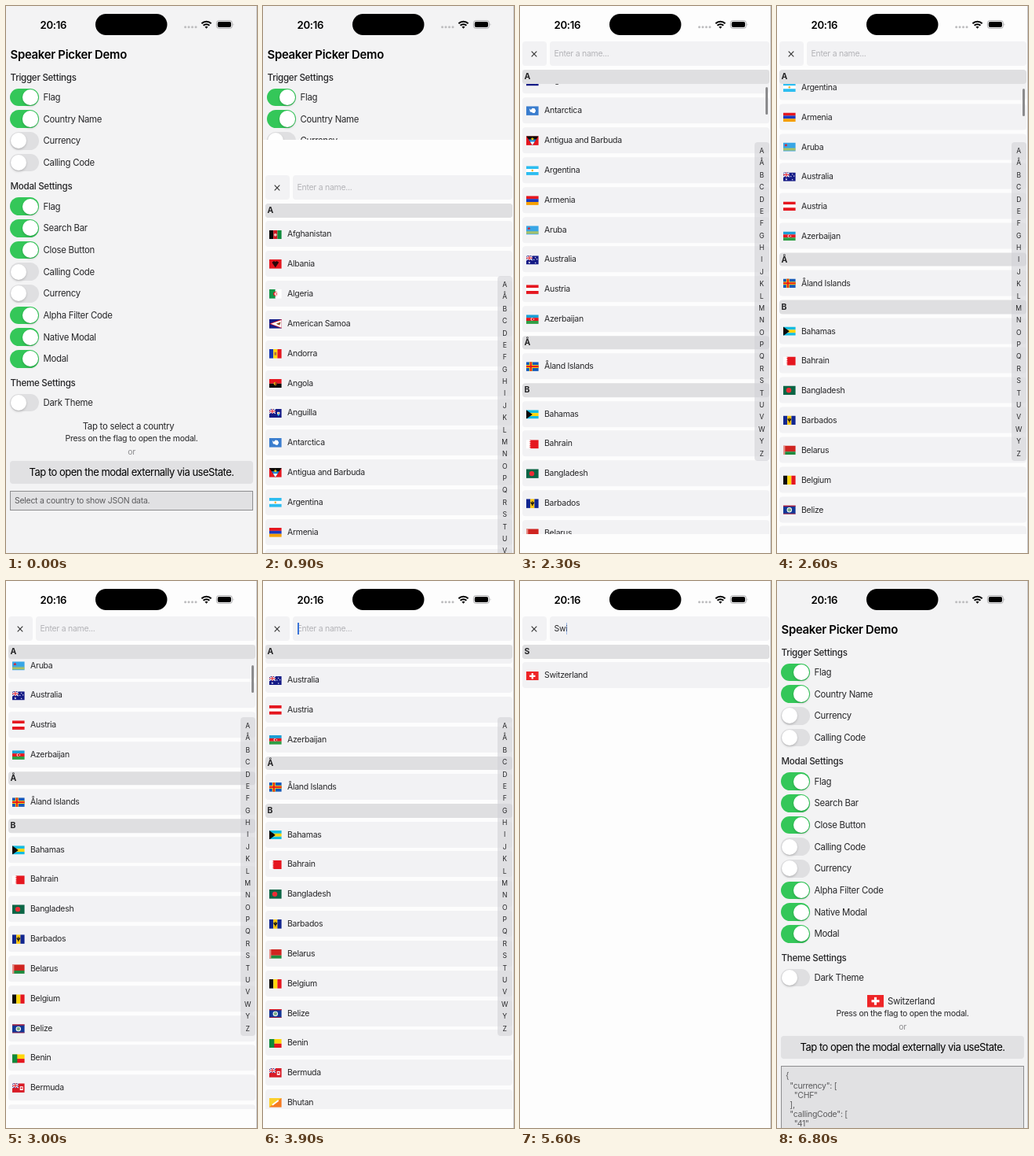
Recreate the animation shown at these times as an HTML page. Size 320 by 695 pixels, loop 8000 ms.

```html
<!DOCTYPE html>
<html lang="en">
<head>
<meta charset="utf-8">
<title>Country picker</title>
<style>
  html, body { margin: 0; width: 100%; height: 100%; overflow: hidden; background: #f3f3f4; }
  #stage { position: absolute; left: 0; top: 0; width: 320px; height: 695px; overflow: hidden;
    font: 10.5px Inter, sans-serif; letter-spacing: -.027em; color: #262628; }
  #stage div, #stage svg { position: absolute; box-sizing: border-box; }
  .t { white-space: pre; height: 20px; line-height: 20px; }
  .mid { left: 0; width: 320px; text-align: center; }
  .head { font-size: 11.6px; font-weight: 500; left: 5.5px; }
  .opt { font-size: 11.4px; left: 47.5px; }
  .switch { left: 5px; width: 37.2px; height: 22.6px; border-radius: 12px; background: #dfdfe1; }
  .switch::after { content: ""; position: absolute; left: 1.2px; top: 1.2px; width: 20.2px; height: 20.2px;
    border-radius: 50%; background: #fff; box-shadow: 0 1.5px 3px rgba(0,0,0,.18); }
  .switch.on { background: #34c759; }
  .switch.on::after { left: 15.8px; }
  .screen { left: 0; top: 0; width: 320px; height: 695px; }
  #home { background: #f3f3f4; }
  #picked { left: -4px; top: 524.3px; font-size: 11.4px; }
  #button { left: 5px; top: 578px; width: 310px; height: 28.5px; line-height: 28.5px; border-radius: 4px;
    background: #e1e1e3; color: #000; font-size: 13px; letter-spacing: -.038em; text-align: center; }
  #json { left: 5px; top: 616px; width: 310px; padding: 6.3px 5px 4.3px; border: 1px solid #8d8d8f;
    background: #e1e1e3; color: #5c5c5e; font-size: 10.5px; line-height: 12.2px; white-space: pre; }
  #modal { background: #fdfdfd; }
  .box, .row { background: #f2f2f4; border-radius: 4px; }
  #list { left: 0; top: 81px; width: 320px; height: 590px; overflow: hidden; }
  .page { left: 0; top: 0; width: 320px; }
  .row { left: 3px; width: 315px; height: 33px; line-height: 33px; padding-left: 28px; white-space: pre; }
  .row svg { left: 5px; top: 11.2px; width: 15.6px; height: 11.6px; }
  .letter { left: 3px; width: 315px; height: 17.6px; line-height: 17.6px; padding-left: 2.5px;
    border-radius: 4px; background: #dfdfe1; font-weight: 700; }
  #index { left: 299px; top: 173px; width: 18.5px; height: 405px; border-radius: 4px; background: rgba(212,212,216,.62); }
  #index div { left: 0; width: 18.5px; text-align: center; font-size: 8.6px; letter-spacing: 0; }
  #bar { left: 313.3px; width: 2.4px; border-radius: 2px; background: #8b8b8d; }
  #caret { top: 53px; width: 1.4px; height: 15px; background: #3b74d8; }
  #edge { left: 319px; top: 0; width: 1px; height: 695px; background: #c6c6c8; }
</style>
</head>
<body>
<div id="stage">
  <div id="home" class="screen">
    <div class="t" style="left:5.5px;top:51.5px;font-size:14.9px;font-weight:600;color:#000">Speaker Picker Demo</div>
    <div id="picked" class="t mid"></div>
    <div class="t mid" style="top:539.5px">Press on the flag to open the modal.</div>
    <div class="t mid" style="top:557px;color:#8e8e90">or</div>
    <div id="button">Tap to open the modal externally via useState.</div>
    <div id="json"></div>
  </div>
  <div id="modal" class="screen">
    <div class="box" style="left:3px;top:45px;width:30.5px;height:30.5px"></div>
    <svg style="left:14px;top:56.5px" width="8" height="8" stroke="#333" stroke-width="1.1"><path d="M.7 .7L7.3 7.3M7.3 .7L.7 7.3"/></svg>
    <div class="box" style="left:38px;top:45px;width:280px;height:30.5px"></div>
    <div id="query" class="t" style="left:43.5px;top:50.5px"></div>
    <div id="caret"></div>
    <div id="list"><div id="sticky" class="letter" style="top:0;z-index:1"></div></div>
    <div id="bar"></div>
    <div id="index"></div>
  </div>
  <div class="t" style="left:43.5px;top:13.5px;font-size:13.2px;font-weight:600;color:#000">20:16</div>
  <svg width="320" height="45" style="left:0;top:0">
    <rect x="114" y="10" width="91.5" height="27" rx="13.5"/>
    <g fill="#bdbdbf"><circle cx="228.6" cy="26.7" r="1.5"/><circle cx="233" cy="26.7" r="1.5"/><circle cx="237.5" cy="26.7" r="1.5"/><circle cx="242" cy="26.7" r="1.5"/></g>
    <g fill="none" stroke="#000" stroke-width="2"><path d="M249.4 22.2a8.7 8.7 0 0 1 12.2 0M251.6 24.8a5.6 5.6 0 0 1 7.8 0"/></g>
    <path d="M253.5 26.6a2.9 2.9 0 0 1 4 0l-2 2.1z"/>
    <rect x="268.4" y="18.6" width="20" height="9.8" rx="3" fill="none" stroke="#a3a3a5" stroke-width=".9"/>
    <rect x="269.8" y="20" width="17.2" height="7" rx="1.9"/>
    <path d="M289.6 21.8q1.6 1.7 0 3.4z" fill="#a3a3a5"/>
  </svg>
  <div id="edge"></div>
</div>
<script>
const $ = id => document.getElementById(id);
function add(parent, cls, html, top, style = {}) {
  const el = document.createElement('div');
  el.className = cls;
  el.innerHTML = html;
  el.style.top = top + 'px';
  Object.assign(el.style, style);
  parent.append(el);
  return el;
}

// Flag drawing on a 16 x 12 grid
const RED = '#e5161f', BLUE = '#141a86', SKY = '#2cbdf0', GREEN = '#0f8a3c', GOLD = '#ffd60a', W = '#fff', K = '#0a0a0a';
const rect = (x, y, w, h, c) => `<rect x="${x}" y="${y}" width="${w}" height="${h}" fill="${c}"/>`;
const poly = (pts, c) => `<polygon points="${pts}" fill="${c}"/>`;
const dot = (x, y, r, c) => `<circle cx="${x}" cy="${y}" r="${r}" fill="${c}"/>`;
const fill = c => rect(0, 0, 16, 12, c);
const bars = (...cs) => cs.map((c, i) => rect(0, i * 12 / cs.length, 16, 12 / cs.length, c)).join('');
const cols = (...cs) => cs.map((c, i) => rect(i * 16 / cs.length, 0, 16 / cs.length, 12, c)).join('');
const star = (x, y, r, c) => poly([...Array(10)].map((_, i) => {
  const a = i * Math.PI / 5, q = i % 2 ? r * .4 : r;
  return (x + q * Math.sin(a)).toFixed(2) + ',' + (y - q * Math.cos(a)).toFixed(2);
}).join(' '), c);
const moon = (x, y, r, c, bg) => dot(x, y, r, c) + dot(x + r * .35, y, r * .8, bg);
const cross = (bg, a, b) => fill(bg) + rect(4, 0, 4, 12, a) + rect(0, 4, 16, 4, a) + rect(5, 0, 2, 12, b) + rect(0, 5, 16, 2, b);
const jack = rect(0, 0, 8, 6, BLUE) + `<path d="M0 0L8 6M8 0L0 6" stroke="#fff" stroke-width="1.2"/>` +
  rect(3, 0, 2, 6, W) + rect(0, 2, 8, 2, W) + rect(3.5, 0, 1, 6, RED) + rect(0, 2.5, 8, 1, RED);
const ensign = (c, badge) => fill(c) + jack + badge;
const wave = y => `<path d="M0 ${y}q2-1.6 4 0t4 0 4 0 4 0" fill="none" stroke="${BLUE}" stroke-width="1.2"/>`;

const flags = {
  'Afghanistan': cols(K, '#cf1a22', GREEN) + dot(8, 6, 1.9, '#eec2b8'),
  'Albania': fill(RED) + poly('8,3 10,2 12.5,4 10.5,7 8,10.5 5.5,7 3.5,4 6,2', '#2a0709'),
  'Algeria': cols('#159447', W) + moon(8, 6, 2.8, RED, W) + star(9.2, 6, 1.4, RED),
  'American Samoa': fill(BLUE) + poly('16,0 16,12 0,6', RED) + poly('16,1 16,11 2,6', W) + poly('9,6 15,3.5 13.5,8', '#8a4a20'),
  'Andorra': cols('#1636b0', GOLD, RED) + rect(6.6, 4, 2.8, 4, '#b5703a'),
  'Angola': bars(RED, K) + moon(8, 6, 2.2, GOLD, '#7a1618') + star(8.4, 5.6, 1.1, GOLD),
  'Anguilla': ensign(BLUE, rect(10.3, 4, 3.4, 3, W) + poly('10.3,7 13.7,7 12,9.5', SKY) + dot(12, 5.5, .9, '#f39a2b')),
  'Antarctica': fill('#3a7dce') + poly('4,3 6,5 8,2.5 11,3 12.5,6 11,9 8.5,9 7.5,8 5,7.5', W),
  'Antigua and Barbuda': fill(RED) + poly('0,0 16,0 8,12', K) + poly('3,4.5 13,4.5 8,12', '#1f86dc') + poly('5,7.5 11,7.5 8,12', W) + star(8, 3.8, 2.5, GOLD),
  'Argentina': bars(SKY, W, SKY) + dot(8, 6, 1.3, '#f2b632'),
  'Armenia': bars(RED, '#1a3ac0', '#f7a000'),
  'Aruba': fill('#38a6e6') + rect(0, 7.5, 16, .9, GOLD) + rect(0, 9.3, 16, .9, GOLD) + star(3.5, 3.5, 2.4, RED),
  'Australia': ensign(BLUE, star(4, 9, 1.7, W) + star(12, 2.4, 1.1, W) + star(10, 5.2, 1.1, W) + star(14, 4.8, 1.1, W) + star(12, 9.4, 1.2, W)),
  'Austria': bars(RED, W, RED),
  'Azerbaijan': bars('#1a9fd6', RED, '#2f9f45') + moon(7.5, 6, 1.8, W, RED) + star(9.8, 6, 1.1, W),
  'Åland Islands': cross('#1559b8', GOLD, RED),
  'Bahamas': bars('#12bce0', GOLD, '#12bce0') + poly('0,0 8,6 0,12', K),
  'Bahrain': fill(W) + poly('16,0 4,0 6,1.2 4,2.4 6,3.6 4,4.8 6,6 4,7.2 6,8.4 4,9.6 6,10.8 4,12 16,12', RED),
  'Bangladesh': fill('#0b6545') + dot(7.2, 6, 3.3, '#ec2b35'),
  'Barbados': cols('#11268f', '#fcc60e', '#11268f') + `<path d="M8 3v6M6.2 4q0 2.6 1.8 2.6T9.8 4" fill="none" stroke="#111" stroke-width="1.2"/>`,
  'Belarus': rect(0, 0, 16, 8, '#cf2420') + rect(0, 8, 16, 4, '#1f8a3e') + rect(0, 0, 2.4, 12, '#e58f88'),
  'Belgium': cols(K, GOLD, RED),
  'Belize': fill('#123796') + rect(0, 0, 16, 1.3, RED) + rect(0, 10.7, 16, 1.3, RED) + dot(8, 6, 3.3, W) + dot(8, 6, 2.3, '#79ad86'),
  'Benin': bars(GOLD, RED) + rect(0, 0, 6.5, 12, GREEN),
  'Bermuda': ensign('#d81b26', rect(10, 4, 4, 5, W) + dot(12, 6.3, 1.2, RED)),
  'Bhutan': fill('#f57a20') + poly('0,0 16,0 0,12', '#fbcf2b') + `<path d="M4 9L12 3" stroke="#fff" stroke-width="2"/>`,
  'Bolivia': bars(RED, GOLD, GREEN),
  'Botswana': fill(SKY) + rect(0, 4, 16, 4, W) + rect(0, 4.5, 16, 3, K),
  'Bosnia and Herzegovina': fill('#10219a') + poly('3,0 16,0 16,12', GOLD),
  'Bouvet Island': cross(RED, W, BLUE),
  'British Virgin Islands': ensign(BLUE, rect(10.4, 3.5, 3.4, 3.5, '#2b8d4b') + poly('10.4,7 13.8,7 12.1,9.6', GREEN) + rect(11.7, 4.5, .9, 3.5, W)),
  'Burkina Faso': bars(RED, '#0f9a46') + star(8, 6, 3, GOLD),
  'British Indian Ocean Territory': fill('#f4f6fb') + [1, 3, 5, 7, 9, 11].map(wave).join('') + jack,
  'Cyprus': fill(W) + poly('4,5.5 7,4 12.5,2.5 10.5,5.5 8,7.3 5,7', '#f5b700') + `<path d="M5.5 8.6q2.5 1.6 5 0" fill="none" stroke="#5f8a46"/>`,
  'Costa Rica': fill('#17307f') + rect(0, 2, 16, 8, W) + rect(0, 4, 16, 4, RED),
  'Cook Islands': ensign(BLUE, star(12, 3.5, 1.2, W) + star(14, 6.2, 1.2, W) + star(12, 9, 1.2, W) + star(10, 6.2, 1.2, W)),
  'Eswatini': bars('#3e5eb9', '#b10c0c', '#3e5eb9') + rect(0, 3, 16, .8, GOLD) + rect(0, 8.2, 16, .8, GOLD) + dot(8, 6, 1.8, W),
  'Sweden': fill('#1a5fa8') + rect(5, 0, 2, 12, GOLD) + rect(0, 5, 16, 2, GOLD),
  'Switzerland': fill('#ee2527') + rect(6.8, 2.2, 2.4, 7.6, W) + rect(4.2, 4.8, 7.6, 2.4, W),
};
const flag = (name, attrs = '') =>
  `<svg viewBox="0 0 16 12" preserveAspectRatio="none" ${attrs}>${flags[name]}</svg>`;

// Lists of countries, grouped under their first letter
const names = Object.keys(flags);
const lists = {
  all: names.slice(0, names.indexOf('Botswana')),
  s: ['American Samoa', 'Australia', 'Austria', 'Afghanistan', 'Åland Islands', 'Bahamas', 'Botswana', 'Belarus',
    'Barbados', 'Bangladesh', 'Bosnia and Herzegovina', 'Bouvet Island', 'British Virgin Islands', 'Burkina Faso',
    'British Indian Ocean Territory', 'Cyprus', 'Costa Rica', 'Cook Islands'],
  sw: ['Botswana', 'Eswatini', 'Switzerland', 'Sweden'],
  swi: ['Switzerland'],
};
const GAP = 4.83, pages = {};
let pressed;
for (const key in lists) {
  const page = pages[key] = add($('list'), 'page', '', 0);
  let y = 0, letter = '';
  for (const name of lists[key]) {
    if (name[0] !== letter) {
      letter = name[0];
      add(page, 'letter', letter, y);
      y += 17.6 + GAP;
    }
    const row = add(page, 'row', flag(name) + name, y);
    if (key === 'all' && name === 'Australia') pressed = row;
    y += 33 + GAP;
  }
}
[...'AÅBCDEFGHIJKLMNOPQRSTUVWYZ'].forEach((c, i) => add($('index'), 't', c, 1 + i * 15.38));

// Settings: label position, then switches 27.67px apart
const groups = [
  [90.5, 'Trigger Settings', '+Flag', '+Country Name', '-Currency', '-Calling Code'],
  [229.3, 'Modal Settings', '+Flag', '+Search Bar', '+Close Button', '-Calling Code', '-Currency',
    '+Alpha Filter Code', '+Native Modal', '+Modal'],
  [478.6, 'Theme Settings', '-Dark Theme'],
];
for (const [y, title, ...options] of groups) {
  add($('home'), 't head', title, y - 10);
  options.forEach((o, i) => {
    const cy = y + 25.4 + i * 27.67;
    add($('home'), 'switch' + (o[0] === '+' ? ' on' : ''), '', cy - 11.3);
    add($('home'), 't opt', o.slice(1), cy - 10);
  });
}

const SWISS = flag('Switzerland', 'width="21" height="15.5" style="left:119px;top:2.2px"') +
  '<span style="position:absolute;left:145px">Switzerland</span>';
const JSON_TEXT = JSON.stringify({ currency: ['CHF'], callingCode: ['41'], region: 'Europe' }, null, 2);

// Value of the latest step at or before t
const at = (t, steps) => steps.reduce((v, [time, next]) => t >= time ? next : v, steps[0][1]);

function scrollAt(t) {
  if (t < 2000) return 0;
  if (t < 4200) return 487.5 - 130 * Math.pow(.82, (Math.min(t, 3200) - 2600) / 100);
  return at(t, [[4200, 150], [4300, 116], [4400, 99], [4500, 95], [4700, 93.6], [4800, 35], [4900, 0]]);
}

const slide = [[0, 695], [800, 440], [900, 170], [1000, 45], [1100, 0], [6300, 130], [6400, 480], [6500, 695]];
const typed = [[0, ''], [4200, 'S'], [4900, 'Sw'], [5100, 'Swi']];
const caretX = { '': 44.2, S: 49.2, Sw: 57, Swi: 59 };
const caretAlpha = [[0, 0], [3900, 1], [5600, .45], [5700, 0], [6000, .45], [6100, 1]];
const barAlpha = [[0, 0], [1900, 1], [3100, .5], [3200, 0]];
const pressAlpha = [[0, 1], [1900, .25], [2000, .6], [2100, 1]];

let shown = null;
function draw(t) {
  t = Math.floor(t / 100) * 100;
  const text = at(t, typed), key = text.toLowerCase() || 'all', scroll = scrollAt(t), done = t >= 6300;
  $('modal').style.transform = `translateY(${at(t, slide)}px)`;
  $('query').textContent = text || 'Enter a name...';
  $('query').style.color = text ? '#262628' : '#b4b4b8';
  $('caret').style.left = caretX[text] + 'px';
  $('caret').style.opacity = at(t, caretAlpha);
  for (const k in pages) pages[k].style.display = k === key ? '' : 'none';
  pages[key].style.transform = `translateY(${-scroll}px)`;
  $('sticky').textContent = lists[key][0][0];
  $('index').style.display = text ? 'none' : '';
  $('bar').style.opacity = at(t, barAlpha);
  $('bar').style.top = 97 + scroll * .0235 + 'px';
  $('bar').style.height = Math.min(35, 20 + scroll * .1) + 'px';
  pressed.style.opacity = at(t, pressAlpha);
  if (shown !== done) {
    shown = done;
    $('picked').innerHTML = done ? SWISS : 'Tap to select a country';
    $('json').textContent = done ? JSON_TEXT : 'Select a country to show JSON data.';
  }
}

const start = performance.now();
function tick() {
  draw((performance.now() - start) % 8000);
  requestAnimationFrame(tick);
}
tick();
</script>
</body>
</html>
```
